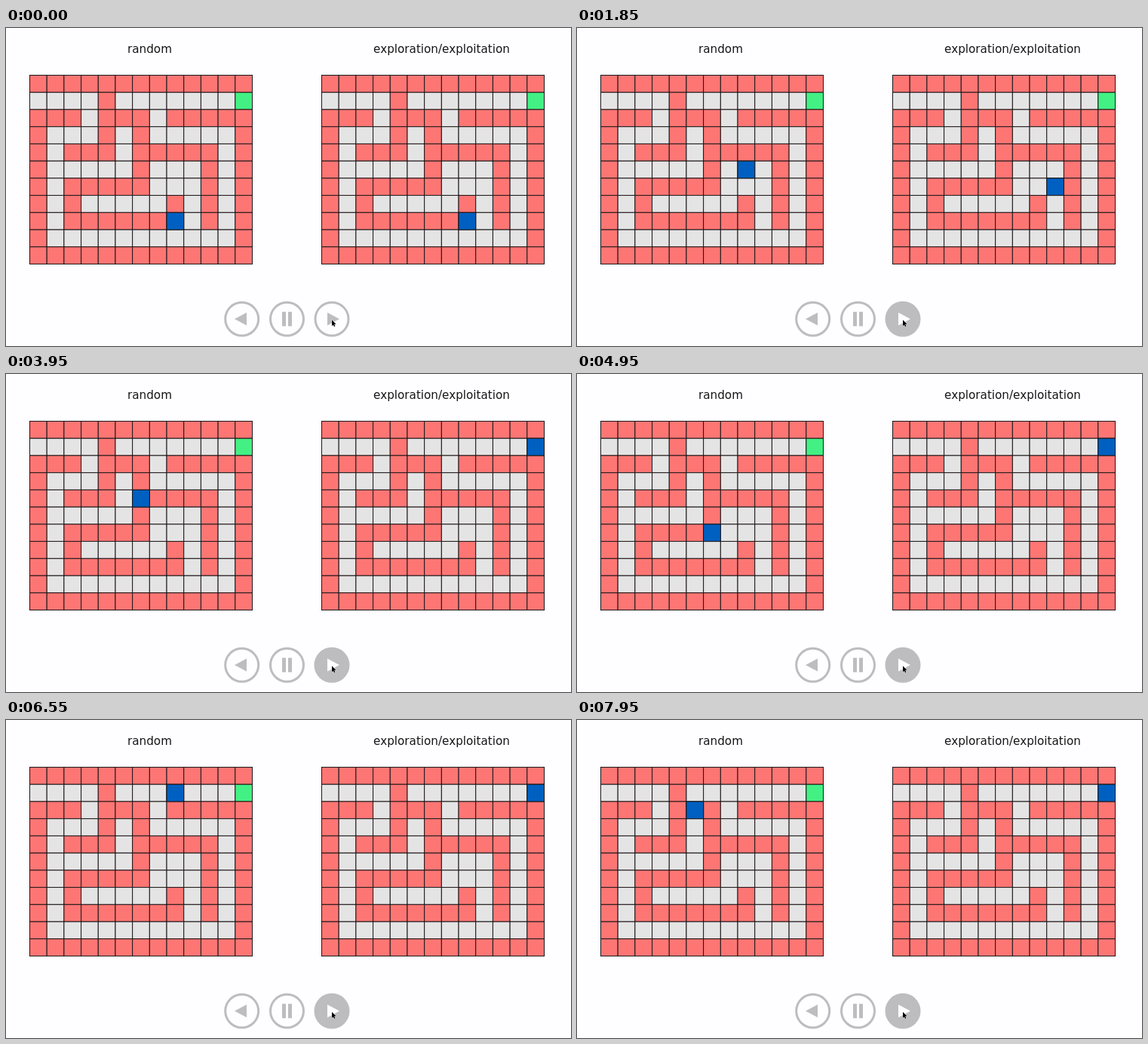
Recreate the animation shown at these times as an HTML page. Size 749 by 421 pixels, loop 8 s.

```html
<!DOCTYPE html>
<html lang="en">
<head>
<meta charset="utf-8">
<title>Maze agents</title>
<style>
  html, body { margin: 0; width: 100%; height: 100%; overflow: hidden; background: #fefdff; }
  svg { display: block; width: 749px; height: 421px; }
  text { font: 15.2px "DejaVu Sans", sans-serif; text-anchor: middle; fill: #161616; }
</style>
</head>
<body>
<svg id="stage" viewBox="0 0 749 421" xmlns="http://www.w3.org/2000/svg"></svg>
<script>
const LOOP = 8000, PRESS = 450, FIRST = 730, STEP = 180;
const CELL_W = 295 / 13, CELL_H = 250 / 11, TOP = 62.5;
const GREY = '#bdbcbe', PAPER = '#fefdff', BLUE = '#0060c1';
const FILL = { '#': '#fd7674', '.': '#e5e4e5', G: '#42f083' };
const MAZE = [
  '#############',
  '....#.......G',
  '###.###.#####',
  '#...#.#.....#',
  '#.###.#####.#',
  '#.....#...#.#',
  '#.#####...#.#',
  '#.#.....#.#.#',
  '#.#######.#.#',
  '#...........#',
  '#############'
];
const MOVES = { U: [0, -1], D: [0, 1], L: [-1, 0], R: [1, 0] };
const START = [8, 8];

const stage = document.getElementById('stage');

function add(tag, attrs, text) {
  const el = document.createElementNS(stage.namespaceURI, tag);
  for (const key in attrs) el.setAttribute(key, attrs[key]);
  if (text) el.textContent = text;
  return stage.appendChild(el);
}

function trail(moves) {
  const cells = [START];
  for (const m of moves) {
    const [x, y] = cells[cells.length - 1], [dx, dy] = MOVES[m];
    cells.push([x + dx, y + dy]);
  }
  return cells;
}

function makeBoard(left, title, moves) {
  const rect = (x, y, fill) => add('rect', {
    x: left + x * CELL_W, y: TOP + y * CELL_H, width: CELL_W, height: CELL_H,
    fill, stroke: '#1c1618', 'stroke-width': 1
  });
  add('text', { x: left + 159, y: 32.5 }, title);
  MAZE.forEach((row, y) => [...row].forEach((c, x) => rect(x, y, FILL[c])));
  return { agent: rect(...START, BLUE), left, cells: trail(moves) };
}

const boards = [
  makeBoard(31.5, 'random', 'RUULURL' + 'LLDLUU' + 'DRLUR' + 'DLDRRL' + 'RUULURURU' + 'LLRLDLUD'),
  makeBoard(418.5, 'exploration/exploitation', 'LRDURUU' + 'UULRUU' + 'URRR')
];

const ring = x => add('circle', {
  cx: x, cy: 385.3, r: 22, fill: PAPER, stroke: GREY, 'stroke-width': 3
});
const shape = d => add('path', { d, fill: GREY });

ring(312.7);
shape('M303 385.3L319 376.8V393.8Z');
ring(372.5);
shape('M366 375.8h5v19h-5zM374 375.8h5v19h-5z');
const playRing = ring(432);
const playIcon = shape('M442 385.3L426 376.8V393.8Z');
add('path', {
  d: 'M432 386.5v8l1.8-1.6 1.3 2.7 1.3-.6-1.3-2.7h2.5z',
  fill: '#000', stroke: '#fff', 'stroke-width': 0.8, 'paint-order': 'stroke'
});

function draw(t) {
  const on = t >= PRESS;
  playRing.setAttribute('fill', on ? GREY : PAPER);
  playIcon.setAttribute('fill', on ? PAPER : GREY);
  const step = Math.max(0, Math.floor((t - FIRST) / STEP) + 1);
  for (const { agent, left, cells } of boards) {
    const [x, y] = cells[Math.min(step, cells.length - 1)];
    agent.setAttribute('x', left + x * CELL_W);
    agent.setAttribute('y', TOP + y * CELL_H);
  }
}

const begin = performance.now();
function tick() {
  draw((performance.now() - begin) % LOOP);
  requestAnimationFrame(tick);
}
draw(0);
requestAnimationFrame(tick);
</script>
</body>
</html>
```
